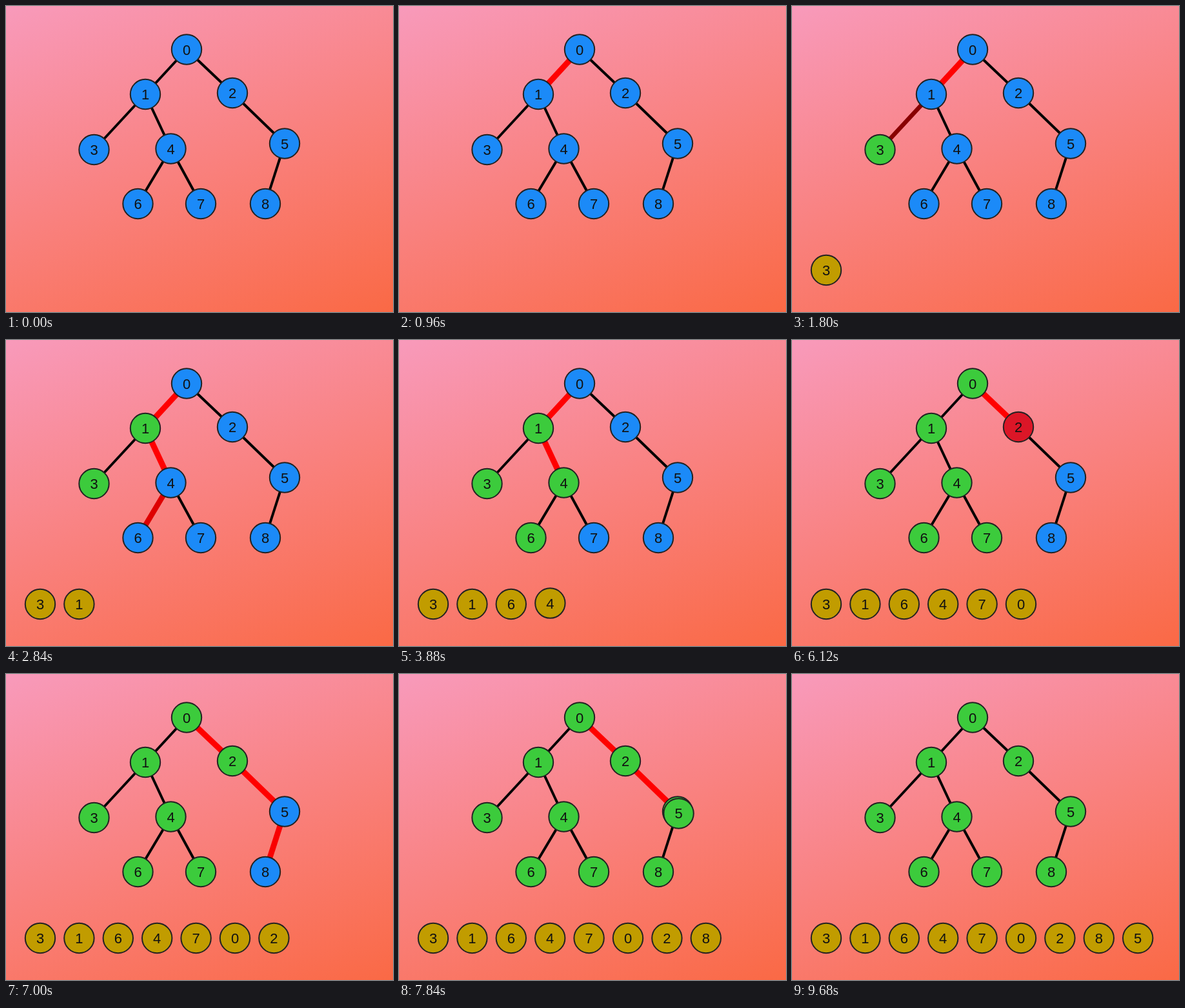
Animation of 600 by 475 pixels, one loop 9760 ms. Source, as an HTML page with a canvas:

```html
<!DOCTYPE html>
<html lang="en">
<head>
<meta charset="utf-8">
<title>In-order traversal</title>
<style>
html, body { margin: 0; width: 100%; height: 100%; overflow: hidden; }
body { background: linear-gradient(160deg, #f89abb, #fa6945); }
canvas { display: block; }
</style>
</head>
<body>
<canvas id="stage" width="600" height="475"></canvas>
<script>
const ctx = document.getElementById('stage').getContext('2d');
const LOOP = 9760, START = 588, STEP = 196;
const BLUE = [27, 138, 248], GREEN = [60, 203, 60], GOLD = [193, 156, 0];
const RED = [255, 0, 0], BLACK = [0, 0, 0];

const nodes = [
  { x: 280, y: 67.5, left: 1, right: 2 },
  { x: 216, y: 137, left: 3, right: 4 },
  { x: 351, y: 135, right: 5 },
  { x: 136.5, y: 223 },
  { x: 255.5, y: 221.5, left: 6, right: 7 },
  { x: 432, y: 213.5, left: 8 },
  { x: 204.5, y: 307 },
  { x: 302, y: 307 },
  { x: 402, y: 307 }
];

// The traversal as a flat list of equally long steps.
const steps = [];
const add = (type, id, color) => steps.push({ type, id, color });

function descend(child) {
  add('mark', child);
  traverse(child);
  add('unmark', child);
}

function traverse(id) {
  const { left, right } = nodes[id];
  if (left) {
    add('pulse', id, BLUE);
    descend(left);
  }
  add('pulse', id, GREEN);
  add('output', id);
  if (right) {
    descend(right);
    add('pulse', id, GREEN);
  }
}
traverse(0);

const clamp = v => Math.min(1, Math.max(0, v));
const ease = v => 1 - (1 - clamp(v)) ** 3;
const lerp = (a, b, u) => a + (b - a) * u;
const mix = (a, b, u) => a.map((v, i) => lerp(v, b[i], u));
const css = color => `rgb(${color.map(Math.round)})`;

function drawNode(x, y, label, color) {
  ctx.beginPath();
  ctx.arc(x, y, 23.2, 0, 2 * Math.PI);
  ctx.fillStyle = css(color);
  ctx.fill();
  ctx.lineWidth = 2;
  ctx.strokeStyle = '#222';
  ctx.stroke();
  ctx.fillStyle = '#111';
  ctx.fillText(label, x, y + 8);
}

function drawEdge(a, b, heat) {
  ctx.beginPath();
  ctx.moveTo(a.x, a.y);
  ctx.lineTo(b.x, b.y);
  ctx.lineWidth = lerp(4, 9, heat);
  ctx.strokeStyle = css(mix(BLACK, RED, heat));
  ctx.stroke();
}

function draw(time) {
  const colors = nodes.map(() => BLUE);
  const heat = nodes.map(() => 0);   // highlight of the edge above each node
  const output = [];

  steps.forEach(({ type, id, color }, i) => {
    const u = (time - START) / STEP - i;
    if (u < 0) return;
    if (type === 'mark') heat[id] = ease(u);
    if (type === 'unmark') heat[id] = 1 - ease(u);
    if (type === 'output') output.push({ id, u: ease(u) });
    if (type === 'pulse') {
      colors[id] = u < 0.5 ? mix(colors[id], RED, ease(2 * u)) : mix(RED, color, ease(2 * u - 1));
    }
  });

  ctx.clearRect(0, 0, 600, 475);
  ctx.font = '22px "Liberation Sans", Arial, sans-serif';
  ctx.textAlign = 'center';
  for (const node of nodes) {
    for (const child of [node.left, node.right]) {
      if (child) drawEdge(node, nodes[child], heat[child]);
    }
  }
  nodes.forEach((node, id) => drawNode(node.x, node.y, id, colors[id]));
  output.forEach(({ id, u }, i) => {
    const { x, y } = nodes[id];
    drawNode(lerp(x, 53 + 60.4 * i, u), lerp(y, 410, u), id, mix(GREEN, GOLD, u));
  });
}

const origin = performance.now();
function frame() {
  draw((performance.now() - origin) % LOOP);
  requestAnimationFrame(frame);
}
frame();
</script>
</body>
</html>
```
